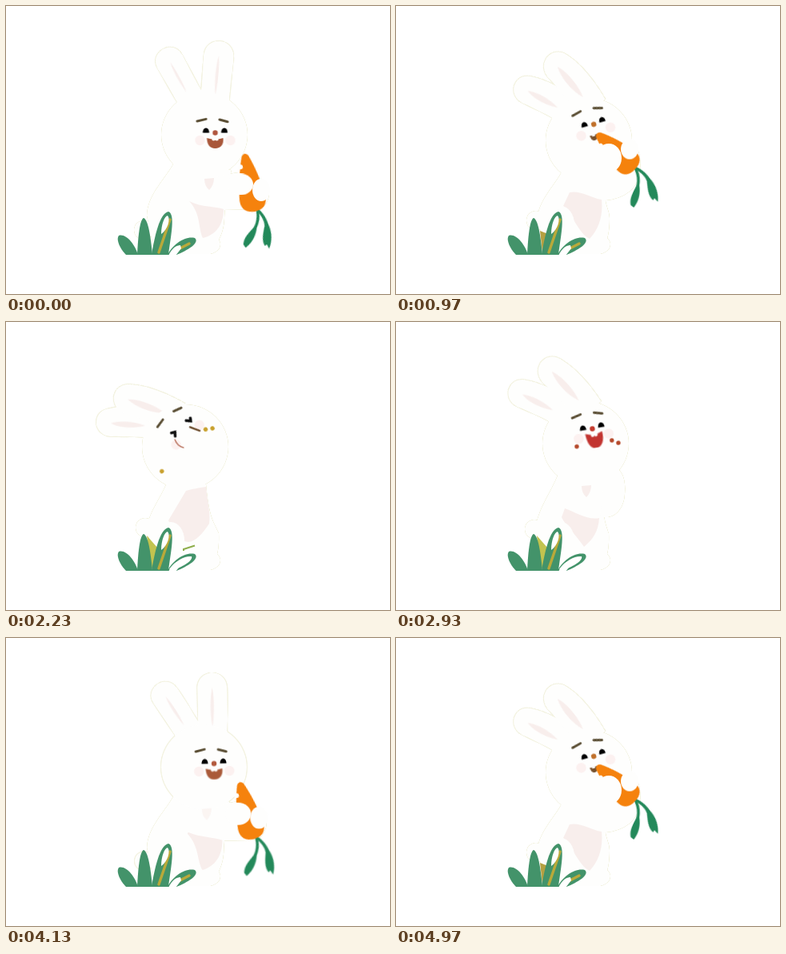
Write an HTML page without scripts that moves like this. It is 480 px wide and 360 px high and loops after 5 s.

```html
<!DOCTYPE html>
<html lang="en">
<head>
<meta charset="utf-8">
<title>Rabbit and carrot</title>
<style>
html, body { margin: 0; width: 100%; height: 100%; overflow: hidden; background: #fff; }
svg { display: block; width: 100vw; height: 100vh; }
.m { animation: 5s ease-in-out infinite; }
.s { animation: 5s step-end infinite; }

/* thin outline around the joined white shapes */
.fur { fill: #fefefd; filter: drop-shadow(0 0 .5px #cfcc84); }
.paw { fill: #fefefd; }
.pink { fill: #f8eeec; }
.orange { fill: #f5820d; }
.leaf { fill: #23895a; }
.green { fill: #43936a; }
.gold { fill: none; stroke: #b9a93a; stroke-width: 3.4; stroke-linecap: round; }
.brow { fill: none; stroke: #5b4f35; stroke-width: 3; stroke-linecap: round; }

/* The eating cycle takes 80%; the rest replays its start and then cuts. */
#bob, #bob2 { animation-name: bob; }
@keyframes bob {
  0%, 11.4%, 19.4%, 32%, 50%, 58.6%, 64%, 91.4%, 99.4%, 100% { transform: none; }
  16.6%, 96.6% { transform: translateY(-5px); }
  22% { transform: translateY(3px); }
  27% { transform: translateY(-6px); }
  55.8%, 61.4% { transform: translateY(-3px); }
}
#head { animation-name: head; }
@keyframes head {
  0%, 80% { transform: translate(248px, 161px); }
  11.4%, 91.4% { transform: translate(242px, 164px); }
  19.4%, 32%, 99.4%, 100% { transform: translate(241px, 168px); }
  43.6% { transform: translate(223px, 157px); }
  44.6% { transform: translate(224px, 156px); }
  53.4%, 60% { transform: translate(237px, 152px); }
  67%, 73.4% { transform: translate(249px, 161px); }
}
#earL { animation-name: earL; }
@keyframes earL {
  0%, 80% { transform: translate(229px, 113px) rotate(-29deg); }
  11.4%, 91.4% { transform: translate(205px, 124px) rotate(-67deg); }
  19.4%, 32%, 99.4%, 100% { transform: translate(208px, 129px) rotate(-62deg); }
  43.6% { transform: translate(177px, 130px) rotate(-90deg); }
  44.6% { transform: translate(180px, 129px) rotate(-87deg); }
  53.4%, 58.6% { transform: translate(202px, 112px) rotate(-64deg); }
  56% { transform: translate(196px, 113px) rotate(-67deg); }
  60% { transform: translate(202px, 112px) rotate(-62deg); }
  67%, 73.4% { transform: translate(231px, 112px) rotate(-29deg); }
}
#earR { animation-name: earR; }
@keyframes earR {
  0%, 67%, 73.4%, 80% { transform: translate(261px, 118px) rotate(5deg); }
  11.4%, 91.4% { transform: translate(236px, 117px) rotate(-47deg); }
  19.4%, 32%, 99.4%, 100% { transform: translate(238px, 119px) rotate(-40deg); }
  43.6% { transform: translate(203px, 116px) rotate(-73deg); }
  44.6% { transform: translate(205px, 116px) rotate(-70deg); }
  53.4%, 60% { transform: translate(233px, 103px) rotate(-43deg); }
}
.ear { animation-name: ear; }
@keyframes ear {
  0%, 67%, 80% { d: path("M-17 12C-17 -10 -18 -30 -18 -50C-18 -74 18 -74 18 -50C18 -30 17 -10 17 12Z"); }
  11.4%, 60%, 91.4%, 100% { d: path("M-17 12C-15 -10 -16 -30 -17 -47C-18 -72 15 -76 19 -51C24 -34 23 -10 19 12Z"); }
}
.inner { animation-name: inner; }
@keyframes inner {
  0%, 67%, 80% { transform: scaleX(.45); }
  11.4%, 60%, 91.4%, 100% { transform: none; }
}
#body { animation-name: body; }
@keyframes body {
  0%, 67%, 73.4%, 80% { d: path("M210 196C196 220 177 236 176 262L186 310L256 310C262 296 272 290 273 265C275 240 276 228 282 205Z"); }
  11.4%, 19.4%, 32%, 91.4%, 100% { d: path("M209 204C197 226 181 240 177 262L186 310L256 310C262 296 267 290 267 265C267 252 256 246 262 200Z"); }
  44.6% { d: path("M201 201C192 222 180 236 176 256L186 310L256 310C262 296 267 290 266 264C260 250 254 246 250 203Z"); }
  53.4%, 60% { d: path("M204 186C196 210 180 228 175 254L186 310L256 310C262 296 267 290 266 264C262 250 256 246 262 180Z"); }
}
#tail { animation-name: tail; }
@keyframes tail {
  0%, 67%, 80% { transform: translate(172px, 280px); }
  11.4%, 32%, 91.4%, 100% { transform: translate(175px, 268px); }
  44.6% { transform: translate(174px, 257px); }
  53.4%, 60% { transform: translate(173px, 259px); }
}
#arm { animation-name: arm; }
@keyframes arm {
  0%, 80% { d: path("M255 215C275 214 295 200 315 214C334 222 332 246 318 254L272 255Z"); }
  11.4%, 19.4%, 32%, 91.4%, 100% { d: path("M262 190C280 165 302 165 305 190C308 220 296 236 270 242L256 244Z"); }
  44.6% { d: path("M230 205C245 195 250 205 251 215C253 230 254 240 246 244L240 245Z"); }
  53.4%, 60% { d: path("M262 180C282 178 288 195 286 215C285 235 272 245 262 244L255 244Z"); }
  67%, 73.4% { d: path("M255 215C275 214 295 205 310 214C326 222 325 238 315 244L272 255Z"); }
}
#belly { animation-name: belly; }
@keyframes belly {
  0%, 67%, 73.4%, 80% { d: path("M229 244C245 252 262 250 272 254C272 274 262 286 246 290C240 278 244 260 229 244Z"); }
  11.4%, 19.4%, 32%, 91.4%, 100% { d: path("M217 233C230 230 244 240 257 242C259 262 254 278 242 291C228 284 222 262 209 250Z"); }
  44.6% { d: path("M225 211C232 209 242 207 250 206C252 225 256 240 254 252C238 276 222 290 203 248Z"); }
  53.4%, 60% { d: path("M211 233C225 238 240 248 254 245C253 262 246 272 235 281C222 262 212 255 207 244Z"); }
}
#chest { animation-name: chest; }
@keyframes chest {
  0%, 80% { transform: translate(254px, 222px); opacity: 1; }
  6%, 48%, 86%, 100% { transform: translate(246px, 216px); opacity: 0; }
  53.4%, 60% { transform: translate(238px, 211px); opacity: 1; }
  67%, 73.4% { transform: translate(252px, 221px); opacity: 1; }
}

#face { animation-name: face; }
@keyframes face {
  0%, 80% { transform: translate(261.5px, 156px); }
  11.4%, 91.4% { transform: translate(247.5px, 142px) rotate(-13deg); }
  19.4%, 32%, 99.4%, 100% { transform: translate(246.5px, 145.5px) rotate(-16deg); }
  44.6% { transform: translate(219.5px, 132px) rotate(-40deg); }
  53.4%, 60% { transform: translate(245px, 131px) rotate(-10deg); }
  67%, 73.4% { transform: translate(260px, 156px); }
}
#brows { animation-name: brows; }
@keyframes brows {
  0%, 67%, 80% { transform: none; }
  11.4%, 91.4% { transform: translateY(-9px); }
  19.4%, 32%, 53.4%, 60%, 99.4%, 100% { transform: translateY(-3px); }
  44.6% { transform: translateY(-8px); }
}
#mouth { animation-name: mouth; }
@keyframes mouth {
  0%, 67%, 73.4%, 80% { transform: none; fill: #a9573a; }
  11.4%, 91.4% { transform: translateY(-7px) scale(1.15, 1.5); fill: #b0722f; }
  16%, 19.4%, 96%, 99.4%, 100% { transform: translate(-4px, 10px) scale(.45, .55); fill: #76502c; }
  22%, 29% { transform: translateY(5px) scale(.7, .8); fill: #a8662f; }
  25.5%, 33% { transform: translate(-4px, 10px) scale(.45, .55); fill: #76502c; }
  37% { transform: translateY(-2px) scale(1, 1.2); fill: #b0722f; }
  42.5%, 47% { transform: translateY(10px) scale(.4); fill: #b0452f; }
  53.4%, 60% { transform: translate(1px, -6px) scale(1.05, 1.5); fill: #c23430; }
}
#nose { animation-name: nose; }
@keyframes nose {
  0%, 67%, 80% { fill: #b0563f; }
  11.4%, 40%, 91.4%, 100% { fill: #c0702b; }
  53.4%, 60% { fill: #c43a2d; }
}
#plain { animation-name: plain; }
@keyframes plain { 0%, 47.2% { opacity: 1; } 42.6% { opacity: 0; } }
#gulp { animation-name: gulp; }
@keyframes gulp { 0%, 47.2% { opacity: 0; } 42.6% { opacity: 1; } }
#crumbs { animation-name: crumbs; }
@keyframes crumbs { 0%, 64% { opacity: 0; } 37% { opacity: 1; fill: #c8a02c; } 49% { opacity: 1; fill: #b5482a; } }
#fall { animation-name: fall; }
@keyframes fall {
  0%, 37%, 50%, 100% { transform: translate(-23px, 21px); }
  44.6% { transform: translate(-54px, 26px); }
}

#carrot { animation-name: carrot; }
@keyframes carrot {
  0%, 80% { transform: translate(311px, 257px) rotate(-10deg); opacity: 1; }
  11.4%, 91.4% { transform: translate(301px, 206px) rotate(-46deg); }
  19.4%, 99.4%, 100% { transform: translate(299px, 204px) rotate(-47deg) scaleY(.89); }
  32% { transform: translate(297px, 202px) rotate(-47deg) scaleY(.8); }
  40% { transform: translate(236px, 158px) rotate(-50deg) scale(.25); opacity: 1; }
  40.1%, 65.9% { transform: translate(268px, 262px) rotate(40deg) scale(.3); opacity: 0; }
  66% { transform: translate(268px, 262px) rotate(40deg) scale(.3); opacity: 1; }
  73.4% { transform: translate(298px, 252px) rotate(3deg) scale(.92, .97); opacity: 1; }
}
#leaves { animation-name: leaves; }
@keyframes leaves {
  0%, 80% { transform: translate(313px, 255px); opacity: 1; }
  11.4%, 91.4% { transform: translate(301px, 206px); }
  19.4%, 99.4%, 100% { transform: translate(298px, 203px); }
  32% { transform: translate(297px, 202px); }
  40% { transform: translate(238px, 158px) scale(.2); opacity: 1; }
  40.1%, 65.9% { transform: translate(268px, 262px) scale(.3); opacity: 0; }
  66% { transform: translate(268px, 262px) scale(.3); opacity: 1; }
  73.4% { transform: translate(300px, 251px) scale(1, .88); opacity: 1; }
}
#leafA { animation-name: leafA; }
@keyframes leafA {
  0%, 80% { transform: rotate(-17deg); }
  9%, 89% { transform: rotate(-60deg); }
  11.4%, 91.4% { transform: rotate(-53deg); }
  19.4%, 27%, 99.4%, 100% { transform: rotate(-34deg); }
  23%, 32% { transform: rotate(-46deg); }
  66%, 73.4% { transform: rotate(58deg); }
}
#leafB { animation-name: leafB; }
@keyframes leafB {
  0%, 80% { transform: rotate(17deg); }
  11.4%, 91.4% { transform: rotate(-11deg); }
  19.4%, 27%, 99.4%, 100% { transform: rotate(2deg); }
  23%, 32% { transform: rotate(-8deg); }
  66%, 73.4% { transform: rotate(74deg); }
}
#pawL { animation-name: pawL; }
@keyframes pawL {
  0%, 80% { transform: translate(293px, 223px) scale(1, .75); }
  11.4%, 91.4% { transform: translate(267px, 193px); }
  19.4%, 32%, 99.4%, 100% { transform: translate(266px, 190px); }
  40% { transform: translate(252px, 190px) scale(.6); }
  41%, 65% { transform: translate(262px, 215px) scale(0); }
  73.4% { transform: translate(276px, 236px) scale(.75, .55); }
}
#pawR { animation-name: pawR; }
@keyframes pawR {
  0%, 80% { transform: translate(319px, 230px); }
  11.4%, 91.4% { transform: translate(294px, 181px) scale(1, .9); }
  19.4%, 32%, 99.4%, 100% { transform: translate(292px, 179px) scale(1, .9); }
  40% { transform: translate(258px, 185px) scale(.6); }
  41%, 65% { transform: translate(266px, 215px) scale(0); }
  73.4% { transform: translate(313px, 229px) scale(.9, 1); }
}

#hollow { animation-name: hollow; }
@keyframes hollow { 0%, 76% { opacity: 1; } 64% { opacity: 0; } }
#gap { animation-name: gap; }
@keyframes gap {
  0%, 64%, 80% { opacity: 0; d: path("M180 281L190 285L188 308H183Z"); }
  11%, 91% { opacity: 1; fill: #b5a041; d: path("M180 281L190 285L188 308H183Z"); }
  36% { opacity: 1; fill: #c2c34f; d: path("M176 267L190 283L188 308H181Z"); }
}
#open { animation-name: open; }
@keyframes open { 0%, 64% { opacity: 0; } 40% { opacity: 1; } }
#blade { animation-name: blade; }
@keyframes blade { 0%, 48% { opacity: 0; } 42% { opacity: 1; } }
</style>
</head>
<body>
<svg viewBox="0 0 480 360">
  <g class="fur">
    <circle id="tail" class="m" r="12"/>
    <ellipse cx="252" cy="298" rx="16" ry="12"/>
    <path id="body" class="m"/>
    <path id="arm" class="m"/>
    <g id="bob" class="m">
      <g id="earL" class="m">
        <path class="ear m"/>
        <path class="pink inner m" d="M-1 -6C-6 -22 -5 -40 0 -49C4 -38 4 -20 -1 -6Z"/>
      </g>
      <g id="earR" class="m">
        <g transform="scale(1.06 1.1)">
          <path class="ear m"/>
          <path class="pink inner m" d="M0 -6C-6 -20 -5 -40 0 -51C5 -40 5 -20 0 -6Z"/>
        </g>
      </g>
      <ellipse id="head" class="m" rx="54" ry="53"/>
    </g>
  </g>
  <path id="belly" class="pink m"/>
  <ellipse class="paw" cx="206" cy="273" rx="17" ry="23"/>
  <path id="chest" class="pink m" d="M-6 -6L6 -7Q6 2 0 8Q-6 3 -6 -6Z"/>

  <g id="bob2" class="m">
    <g id="face" class="m">
      <g fill="#fcf1f0"><circle cx="-19" cy="12" r="6.2"/><circle cx="19" cy="12" r="6.2"/></g>
      <path id="brows" class="brow m" d="M-22.5 -12L-11.5 -14.6M5.5 -14L15.5 -11.2"/>
      <g id="plain" class="s">
        <path d="M-15.5 2.5C-15.5 -5.5 -7.5 -5.5 -7.5 2.5ZM7.5 2.5C7.5 -5.5 15.5 -5.5 15.5 2.5Z"/>
        <circle id="nose" class="m" cy="2.5" r="3.2"/>
        <g id="mouth" class="m">
          <path d="M-10.5 9Q0 12 10 9C11 17 7 22 0 22S-10 17 -10.5 9Z"/>
          <path fill="#fff" d="M-4 9.5H4V11.5Q2 13.5 0 11.5Q-2 13.5 -4 11.5Z"/>
        </g>
      </g>
      <g id="gulp" class="s" fill="none" stroke-linecap="round">
        <path stroke="#111" stroke-width="3.6" d="M-14 -3L-10 -1L-13 3M10 -3L14 1L16 -2"/>
        <path stroke="#6b4a2a" stroke-width="2.4" d="M8.5 6.3L14.7 17.5"/>
        <path stroke="#b0604a" stroke-width="1.3" d="M-16 6Q-19 14 -14.2 20.8"/>
      </g>
      <g id="crumbs" class="s">
        <circle cx="21.5" cy="21" r="2.7"/><circle cx="29" cy="25.5" r="2.7"/>
        <circle id="fall" class="m" r="2.7"/>
      </g>
    </g>
  </g>

  <g id="leaves" class="m">
    <path id="leafA" class="leaf m" d="M-1.5 -2H2C7 6 9 13 9 21C11 33 7 44 1 51L0 45L-3 46C-5 39 -1 31 4 22C6 14 3 6 -1.5 -2Z"/>
    <path id="leafB" class="leaf m" d="M-1.5 -2H2C7 6 8 13 7 21C9 33 6 42 1 49L-3 46C-5 38 -1 31 3 22C5 14 3 6 -1.5 -2Z"/>
  </g>
  <g id="carrot" class="m">
    <path class="orange" d="M0 0C-12 0 -18 -8 -16 -20C-13 -40 -9 -58 -4 -71Q0 -76 4 -71C9 -58 14 -40 16 -20C18 -8 12 0 0 0Z"/>
    <circle class="paw" cx="-8" cy="-58" r="3"/><circle class="paw" cx="-13" cy="-46" r="4"/>
  </g>
  <ellipse id="pawL" class="paw m" rx="16" ry="18"/>
  <ellipse id="pawR" class="paw m" rx="11" ry="14"/>

  <path id="blade" class="s" fill="none" stroke="#8fae4c" stroke-width="2" d="M222 286V284L236 279.5"/>
  <path id="gap" class="s"/>
  <g class="green">
    <path d="M150 311C143 304 137 292 141 287C150 284 161 298 165 311Z"/>
    <path d="M164 311C165 290 167 267 172 265C178 267 181 290 183 311Z"/>
    <path d="M182 311C186 288 192 259 203 257C212 260 206 288 203 311Z"/>
    <path d="M202 311C208 298 224 287 236 290C243 296 226 306 213 311Z"/>
  </g>
  <path class="gold" d="M205 267L191 308M229 297L208 308"/>
  <g id="hollow" class="s" fill="#fff">
    <path d="M194 285C194 273 198 263 202 262C206 266 202 280 194 285Z"/>
    <path d="M203 312C208 302 213 299 218 299L219 303L212 312Z"/>
  </g>
  <path id="open" class="s" fill="#fff" d="M204 309C213 297 224 292 232 293C234 298 222 305 214 308Z"/>
</svg>
</body>
</html>
```
